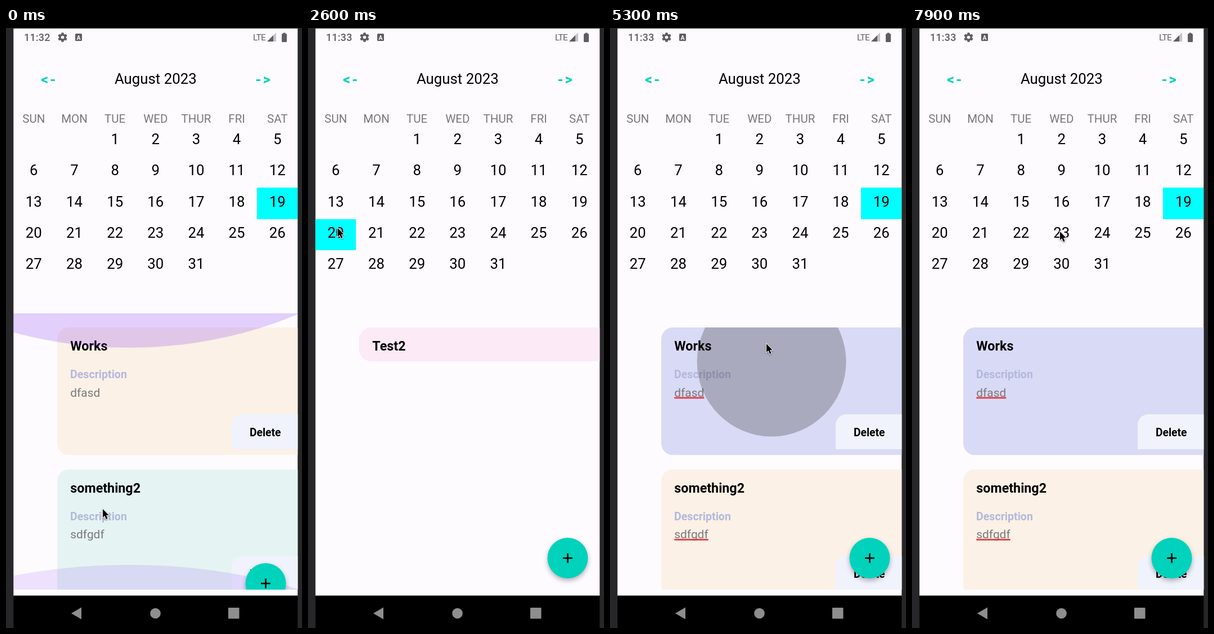
Animation, 526 px wide and 1064 px high, one loop 8000 ms. Source, as an HTML page with a canvas:

```html
<!DOCTYPE html>
<html lang="en">
<head>
<meta charset="utf-8">
<title>Calendar planner</title>
<style>
html, body { margin: 0; width: 100%; height: 100%; overflow: hidden; background: #27272a; }
canvas { display: block; width: 526px; height: 1064px; }
</style>
</head>
<body>
<canvas id="stage" width="526" height="1064"></canvas>
<script>
const ctx = document.getElementById('stage').getContext('2d');
const LOOP = 8000, STEP = 100;
const LEFT = 13.3, RIGHT = 518.3, SCREEN_W = RIGHT - LEFT, MID = (LEFT + RIGHT) / 2;
const LIST_TOP = 506, LIST_BOTTOM = 996, OVERSHOOT = 12.6;
const PAPER = '#fefbff', TEAL = '#00d2bc', GRAY = '#5f5d61', NAV_GRAY = '#8e8e8e';
const CREAM = '#fbf1e6', MINT = '#e5f4f2', LAVENDER = '#d9daf5', PINK = '#fceaf6';

// Story: cursor stops as [arrival, x, y], starts of upward drags, and taps on cards
const TRAVEL = 300, DRAG_HOLD = 500;
const stops = [
  [0, 172, 853], [1300, 187, 653], [1800, 187, 790], [2300, 53, 355], [3200, 481, 310], [4400, 278.5, 634.5],
  [5200, 278, 560], [5700, 276, 707], [6600, 277, 585], [7200, 277, 740], [7900, 263, 361]
];
const drags = [-610, 1100, 6300];
const taps = [[1000, 'something2'], [4700, 'something2'], [5200, 'Works']];
const NEXT_DAY = 2300, BACK = 3300, OPEN_SECOND = 4800, OPEN_FIRST = 5300;

const clamp = v => Math.max(0, Math.min(1, v));
const mix = (a, b, k) => a + (b - a) * k;
const smooth = k => k * k * (3 - 2 * k);
const pulse = (t, start, end, rise, fall) => Math.min(clamp((t - start) / rise), clamp(1 - (t - end) / fall));
const strongest = shape => Math.max(...drags.map(shape));

function cursorAt(t) {
  return stops.reduce(([x, y], [arrival, nx, ny]) => {
    const k = smooth(clamp((t - arrival) / TRAVEL + 1));
    return [mix(x, nx, k), mix(y, ny, k)];
  }, [172, 853]);
}

function text(str, x, y, size, color = '#000', weight = 400, align = 'left', spacing = 0) {
  ctx.font = `${weight} ${size}px Roboto, sans-serif`;
  ctx.letterSpacing = spacing + 'px';
  ctx.textAlign = align;
  ctx.fillStyle = color;
  ctx.fillText(str, x, y);
}

function rect(x, y, w, h, color, radius = 0) {
  ctx.fillStyle = color;
  ctx.beginPath();
  ctx.roundRect(x, y, w, h, radius);
  ctx.fill();
}

function circle(x, y, r, color) {
  ctx.fillStyle = color;
  ctx.beginPath();
  ctx.arc(x, y, r, 0, Math.PI * 2);
  ctx.fill();
}

function polygon(points, color) {
  ctx.fillStyle = color;
  ctx.beginPath();
  points.forEach(p => ctx.lineTo(...p));
  ctx.closePath();
  ctx.fill();
}

function clipped(x, y, w, h, radius, paint) {
  ctx.save();
  ctx.beginPath();
  ctx.roundRect(x, y, w, h, radius);
  ctx.clip();
  paint();
  ctx.restore();
}

function statusBar(t) {
  text(t < 1000 ? '11:32' : '11:33', 32, 23, 18, GRAY, 500, 'left', .2);
  ctx.save();
  ctx.translate(100.5, 16.5);
  for (let i = 0; i < 3; i++) {
    rect(-2.2, -8.3, 4.4, 16.6, GRAY, 1);
    ctx.rotate(Math.PI / 3);
  }
  circle(0, 0, 6.3, GRAY);
  circle(0, 0, 2.8, PAPER);
  ctx.restore();
  rect(123, 10, 12, 13, GRAY, 1.5);
  text('A', 129, 20.5, 10.5, PAPER, 700, 'center');
  text('LTE', 439, 22, 15.5, GRAY, 400, 'left', -.8);
  polygon([[464, 24], [480, 24], [480, 8]], '#c5c3c7');
  polygon([[464, 24], [475, 24], [475, 13]], GRAY);
  rect(490, 10, 9, 15, GRAY, 1.5);
  rect(492.5, 8.5, 4, 3, GRAY);
}

function calendar(t) {
  const cellW = SCREEN_W / 7, cellH = 55.2;
  const center = col => LEFT + cellW * (col + .5);
  text('<-', 62, 99.5, 26, TEAL, 700, 'left', 3);
  text('->', 443.5, 99.5, 26, TEAL, 700, 'left', 3);
  text('August 2023', MID, 99, 25.8, '#000', 400, 'center');
  ['SUN', 'MON', 'TUE', 'WED', 'THUR', 'FRI', 'SAT'].forEach((name, col) =>
    text(name, center(col), 167.5, 20.5, '#7a787c', 400, 'center'));
  const selected = t >= NEXT_DAY && t < BACK ? 20 : 19;
  for (let day = 1; day <= 31; day++) {
    const col = (day + 1) % 7, y = 173 + Math.floor((day + 1) / 7) * cellH;
    if (day === selected) {
      const top = Math.round(y);
      rect(Math.round(center(col) - cellW / 2), top, Math.ceil(cellW - 1), Math.round(y + cellH) - top, '#0ff');
    }
    text(day, center(col), y + 33.2, 25.8, '#000', 400, 'center');
  }
}

function cardsAt(t) {
  const card = (title, color, note, open, marked) => ({ title, color, note, open, marked });
  if (t < NEXT_DAY) return [card('Works', CREAM, 'dfasd', true), card('something2', MINT, 'sdfgdf', true)];
  if (t < BACK) return [card('Test2', PINK)];
  return [
    card('Works', LAVENDER, 'dfasd', t >= OPEN_FIRST, true),
    card('something2', CREAM, 'sdfgdf', t >= OPEN_SECOND, true)
  ];
}

// Grows from the touch point and drifts to the middle of the card while fading
function ripple(start, y, height, t) {
  const fade = clamp(1 - (t - start - 200) / 300);
  if (t < start || !fade) return;
  const [x0, y0] = cursorAt(start), k = clamp((t - start) / 400), drift = k ** .7;
  circle(mix(x0, 302, drift), mix(y0, y + height / 2, drift), mix(70, 320, k), `rgba(0,0,0,${.22 * fade})`);
}

function drawCard(card, y, t) {
  const height = card.open ? 226.5 : 60;
  clipped(91, y, 460, height, 21, () => {
    rect(91, y, 460, height, card.color);
    text(card.title, 114.3, y + 41, 23.3, '#000', 700);
    if (card.open) {
      text('Description', 114, y + 90, 19.6, '#b4b8dc', 700);
      text(card.note, 114.3, y + 122.5, 20.9, '#7b787b');
      if (card.marked) rect(114.3, y + 123.5, ctx.measureText(card.note).width, 2.8, '#e8393f');
      rect(401, y + 154, 150, 62, '#f0f3fc', [19, 0, 0, 0]);
      text('Delete', 433, y + 192.5, 19.3, '#000', 700);
    }
    for (const [start, title] of taps) if (title === card.title) ripple(start, y, height, t);
  });
  return height + 25;
}

// Overscroll arc: a wide circle squashed against the list edge (dir 1 = top, -1 = bottom)
function glow(edge, dir, scale, touchX) {
  if (!scale) return;
  const radius = SCREEN_W * 1.2, depth = radius * (1 - Math.cos(Math.PI / 6));
  ctx.save();
  ctx.translate(mix(MID, touchX, .5), edge);
  ctx.scale(1, dir * scale);
  circle(0, depth - radius, radius, `rgba(98,0,238,${.175 * Math.min(1, (scale / .75) ** 1.6)})`);
  ctx.restore();
}

function fab(offset) {
  ctx.save();
  ctx.translate(461.5, 940 + offset);
  ctx.save();
  ctx.shadowColor = 'rgba(0,0,0,.3)';
  ctx.shadowBlur = 9;
  ctx.shadowOffsetY = 4;
  circle(0, 0, 36, TEAL);
  ctx.restore();
  rect(-8.5, -1.3, 17, 2.6, '#000');
  rect(-1.3, -8.5, 2.6, 17, '#000');
  ctx.restore();
}

function navBar() {
  rect(LEFT, 1006.5, SCREEN_W, 58, '#000');
  polygon([[116, 1038], [134, 1027.5], [134, 1048.5]], NAV_GRAY);
  circle(265.5, 1038, 9.3, NAV_GRAY);
  rect(395, 1028, 19.5, 19.5, NAV_GRAY, 1);
}

function cursor(x, y) {
  const arrow = [[0, 0], [0, 15], [3.4, 12], [6, 18], [8.6, 17], [6.1, 11], [10.8, 11]];
  ctx.save();
  ctx.translate(x, y);
  ctx.shadowColor = 'rgba(0,0,0,.35)';
  ctx.shadowBlur = 3;
  ctx.shadowOffsetY = 1;
  ctx.lineWidth = 2;
  ctx.lineJoin = 'round';
  ctx.strokeStyle = '#fff';
  polygon(arrow, '#000');
  ctx.stroke();
  ctx.shadowColor = 'transparent';
  polygon(arrow, '#000');
  ctx.restore();
}

function draw(t) {
  const [cx, cy] = cursorAt(t);
  // An upward drag scrolls, hides the button and lights the bottom edge; its return lights the top edge
  const pulled = strongest(start => pulse(t, start, start + DRAG_HOLD, 200, 200));
  const returned = strongest(start => pulse(t, start + DRAG_HOLD - 100, start + DRAG_HOLD + 200, 200, 400));
  rect(0, 0, 526, 1064, '#27272a');
  rect(LEFT, 1, SCREEN_W, 1006, PAPER);
  statusBar(t);
  calendar(t);
  clipped(LEFT, LIST_TOP, SCREEN_W, LIST_BOTTOM - LIST_TOP, 0, () => {
    let y = 531 - OVERSHOOT * clamp(pulled * 2 - 1);
    for (const card of cardsAt(t)) y += drawCard(card, y, t);
    glow(LIST_TOP, 1, .75 * returned, cx);
    glow(LIST_BOTTOM, -1, .81 * Math.sqrt(pulled), cx);
    fab(100 * pulled);
  });
  navBar();
  cursor(cx, cy);
}

function frame() {
  const t = performance.now() % LOOP;
  draw(Math.floor(t / STEP) * STEP);
  requestAnimationFrame(frame);
}
frame();
</script>
</body>
</html>
```
